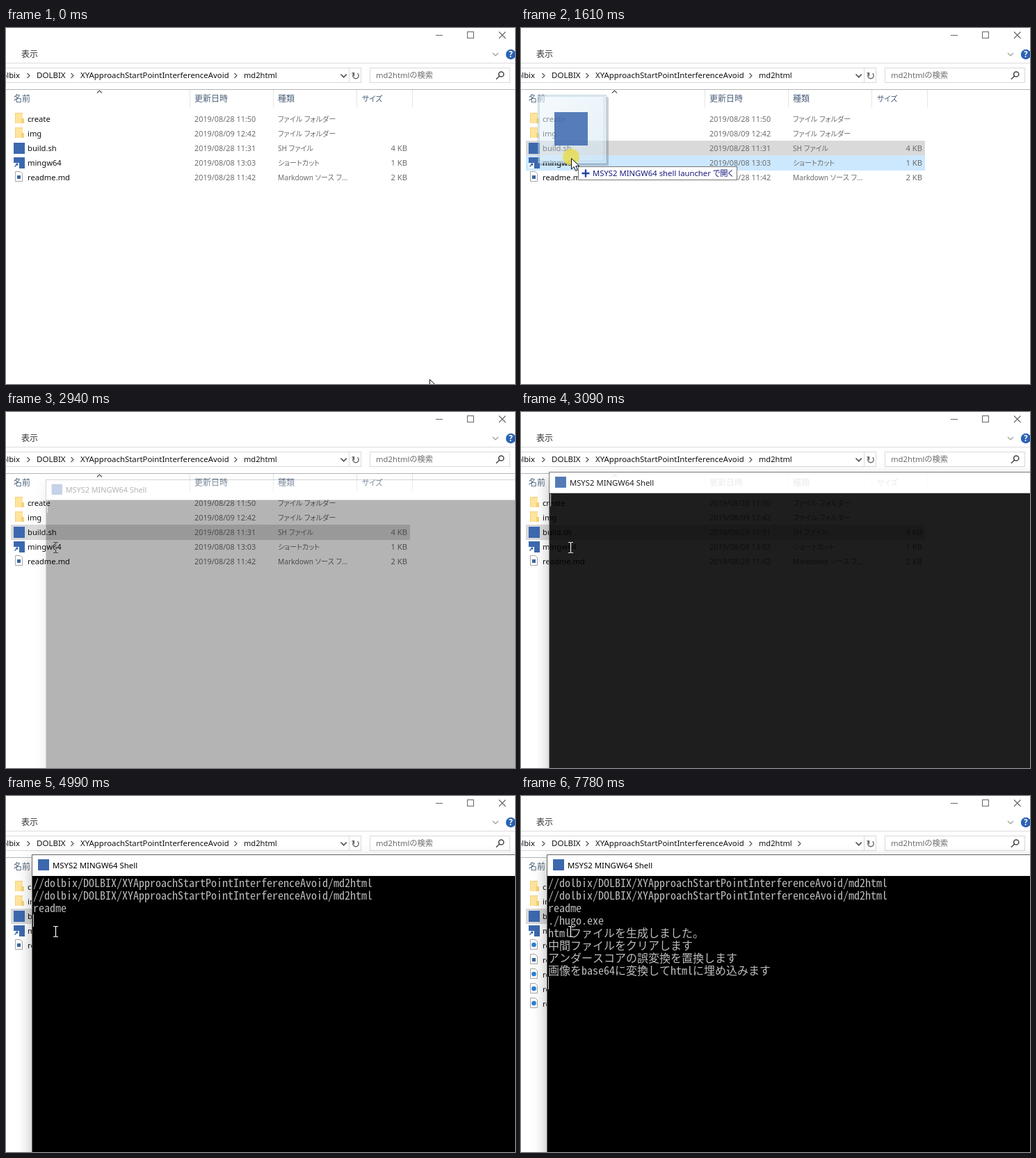
Write an HTML page that moves like this. It is 732 px wide and 512 px high and loops after 8000 ms.

```html
<!DOCTYPE html>
<html lang="ja">
<head>
<meta charset="utf-8">
<title>Build by drag and drop</title>
<style>
  html, body { margin: 0; width: 100%; height: 100%; overflow: hidden; background: #fff; }
  svg { display: block; width: 732px; height: 512px; }
  text { font-family: "Noto Sans", "Noto Sans CJK JP", "Noto Sans CJK", sans-serif; font-feature-settings: "palt"; white-space: pre; }
  .console text { font: 16px "Noto Sans Mono CJK JP", "Noto Sans CJK JP", monospace; font-weight: 300; font-feature-settings: normal; }
  .line { fill: none; stroke-width: 1.2; }
  #beam { mix-blend-mode: difference; }
  #shell { filter: drop-shadow(0 8px 10px rgba(0, 0, 0, .3)); }
</style>
</head>
<body>
<svg id="stage" viewBox="0 0 732 512"></svg>
<script>
const LOOP = 8000;
const BLUE = '#3c68ae', GREY = '#6d6d6d', HEAD = '#4c607a', INK = '#111';
const ROW_TOP = 162, ROW_H = 21;

const text = (x, y, str, size = 11.2, fill = INK, extra = '') =>
  `<text x="${x}" y="${y}" font-size="${size}" fill="${fill}" ${extra}>${str}</text>`;
const rect = (x, y, w, h, fill, extra = '') =>
  `<rect x="${x}" y="${y}" width="${w}" height="${h}" fill="${fill}" ${extra}/>`;
const frame = (x, y, w, h, stroke, fill = '#fff') =>
  rect(x + .5, y + .5, w - 1, h - 1, fill, `stroke="${stroke}"`);
const path = (d, stroke, extra = '') => `<path class="line" d="${d}" stroke="${stroke}" ${extra}/>`;
const group = (id, body, extra = '') => `<g id="${id}" ${extra}>${body}</g>`;
const chevron = x => path(`M${x} 65l3.5 3.5l-3.5 3.5`, '#555');
const END = 'text-anchor="end"';

// File icons, drawn around the row's text baseline
const page = (y, mark) =>
  `<path d="M13.5 ${y - 12.5}h7l3 3v11h-10z" fill="#fff" stroke="#a5a5a5"/>` + mark;
const icons = {
  folder: y => rect(13, y - 13, 11, 15, '#f3d27a') + rect(14, y - 12, 10, 14, '#ffe49c') +
    rect(22, y - 5, 4, 7, '#f5d376'),
  shell: y => rect(11, y - 12, 16, 16, BLUE),
  link: y => rect(11, y - 12, 16, 16, BLUE) + rect(11, y - 4, 8, 8, '#fff') +
    path(`M13 ${y + 2}q0-4 4-4m-2-1.5l2 1.5l-2 2`, '#2b5fae'),
  markdown: y => page(y, rect(16, y - 7, 5, 5, '#3a679f')),
  html: y => page(y, `<circle cx="18.5" cy="${y - 5}" r="3.3" fill="#2a80d2"/>`)
};
const fileRow = (y, icon, name, date, kind, size = '') =>
  icons[icon](y) + text(31, y, name, 11.2) +
  (date ? text(271, y, date, 10.85, GREY) + text(391, y, kind, 10.2, GREY) : '') +
  text(577, y, size, 11.2, GREY, END);

const explorer = () => [
  rect(618, 10, 10, 1, '#666'), frame(663, 5, 10, 10, '#666'),
  path('M709 5.5l9.5 9.5m0-9.5l-9.5 9.5', '#666'),
  text(22, 42, '表示', 12, '#333'), path('M700 36l4 4l4-4', '#999'),
  '<circle cx="726" cy="38" r="7.2" fill="#2a62b5"/>',
  text(726, 42.3, '?', 11.5, '#fff', 'text-anchor="middle" font-weight="700"'),
  rect(0, 50, 732, 1, '#dcdcdc'),
  frame(-5, 57, 516, 22, '#d9d9d9'), rect(493, 58, 1, 20, '#d9d9d9'),
  text(20, 72, 'dolbix', 11.3, INK, END), chevron(30.5),
  text(44, 72, 'DOLBIX', 11.5), chevron(93.5),
  text(107, 72, 'XYApproachStartPointInterferenceAvoid', 11.4), chevron(328.5),
  text(342, 72, 'md2html', 11.1), group('crumb', chevron(398.5)),
  path('M481.5 66.5l4.2 4.2l4.2-4.2', '#555', 'style="stroke-width:1.7"'),
  path('M505.5 65.2a4.2 4.2 0 1 1-5 0m0 4v-4.4h-3', '#666', 'style="stroke-width:1.4"'),
  frame(523, 57, 202, 22, '#d9d9d9'), text(532, 72, 'md2htmlの検索', 11.3, GREY),
  path('M709.5 69.3l-4.5 4.5M708.6 66.5a3.6 3.6 0 1 1 7.2 0a3.6 3.6 0 1 1-7.2 0', '#444', 'style="stroke-width:1.5"'),
  rect(0, 88, 732, 1, '#b4b4b4'),
  ...[264, 384, 504, 584].map(x => rect(x, 89, 1, 25, '#e5e5e5')),
  path('M131 93.5l3.5-3.5l3.5 3.5', '#555'),
  text(11, 105.5, '名前', 12, HEAD), text(271, 105.5, '更新日時', 12, HEAD),
  text(391, 105.5, '種類', 12, HEAD), text(512, 105.5, 'サイズ', 10.8, HEAD),
  rect(7, ROW_TOP, 574, ROW_H + 1, 'none', 'id="buildRow"'),
  rect(7, ROW_TOP + ROW_H, 574, ROW_H + 1, 'none', 'id="linkRow"'),
  rect(7, ROW_TOP + 2 * ROW_H, 574, ROW_H + 1, 'none', 'id="readmeRow"'),
  fileRow(135, 'folder', 'create', '2019/08/28 11:50', 'ファイル フォルダー'),
  fileRow(156, 'folder', 'img', '2019/08/09 12:42', 'ファイル フォルダー'),
  fileRow(177, 'shell', 'build.sh', '2019/08/28 11:31', 'SH ファイル', '4 KB'),
  fileRow(198, 'link', 'mingw64', '2019/08/08 13:03', 'ショートカット', '1 KB'),
  group('readme', fileRow(219, 'markdown', 'readme.md', '2019/08/28 11:42', 'Markdown ソース フ...', '2 KB')),
  ...[219, 261, 282, 303].map(y => group('', fileRow(y, 'html', 'readme.html'), 'class="output"'))
].join('');

const LOG = [
  '//dolbix/DOLBIX/XYApproachStartPointInterferenceAvoid/md2html',
  '//dolbix/DOLBIX/XYApproachStartPointInterferenceAvoid/md2html',
  'readme', './hugo.exe', 'htmlファイルを生成しました。', '中間ファイルをクリアします',
  'アンダースコアの誤変換を置換します', '画像をbase64に変換してhtmlに埋め込みます'
];
const shell = () =>
  rect(37, 84, 890, 581, '#666') + rect(38, 85, 888, 30, '#fff') + rect(38, 115, 888, 549, '#000') +
  rect(46, 91, 16, 16, BLUE) + text(67, 104, 'MSYS2 MINGW64 Shell', 11.4, '#000') +
  group('', LOG.map((s, i) => text(39, 131 + 18 * i, s, 16, '#bcbcbc', 'data-log')).join(''), 'class="console"') +
  rect(39, 116, 1, 18, '#ddd', 'id="caret"');

// Pointer parts are drawn relative to the pointer's tip
const ghost = () =>
  group('', rect(-45, -88, 99, 99, '#000', 'opacity=".35" rx="2"') +
    frame(-48, -91, 99, 99, '#8fb0c4', '#dcebf4') +
    rect(-45.5, -88.5, 93, 93, 'url(#glass)', 'stroke="#9fc4d8"'), 'opacity=".55"') +
  rect(-24, -66, 48, 48, BLUE, 'opacity=".85"');
const tip = () =>
  frame(10, 12, 229, 20, '#767676') +
  path('M15.5 22h11m-5.5-5.5v11', '#2040a8', 'style="stroke-width:2.4"') +
  text(31, 26, 'MSYS2 MINGW64 shell launcher で開く', 11.3, '#1a1a7c');
const arrow = '<path d="M.5.5v15.5l3.7-3.4l2.5 5.8l2.6-1.1l-2.5-5.7h5z" fill="#fff" stroke="#111"/>';

document.getElementById('stage').innerHTML =
  `<defs><linearGradient id="glass" x2="1" y2="1"><stop stop-color="#eef7fc"/><stop offset="1" stop-color="#cfe5f2"/></linearGradient></defs>` +
  explorer() + group('shell', shell()) +
  group('pointer', group('ghost', ghost()) +
    '<circle id="press" cx="0" cy="-1.5" r="12" fill="#e8dc48" opacity=".8"/>' +
    group('tip', tip()) + arrow) +
  group('beam', path('M68 187.5h2.5l1 1l1-1h2.5M71.5 188v14M68 202.5h2.5l1-1l1 1h2.5', '#fff'));

const $ = id => document.getElementById(id);
const show = (el, on) => el.setAttribute('visibility', on ? 'visible' : 'hidden');
// Value of the last step that has begun, for rows of [time, ...values]
const at = (steps, t) => steps.reduce((now, s) => s[0] <= t ? s : now).slice(1);

const ease = p => p * p * (3 - 2 * p);
const approach = Array.from({ length: 9 }, (_, k) => {
  const p = ease(k / 8);
  return [k ? 70 + (k - 1) * 520 / 7 : 0, 609 - 537 * p, 505 - 331 * p];
});
const POINTER = [...approach,
  [1060, 54, 180], [1137, 60, 183], [1213, 72, 188], [1290, 82, 191],
  [1470, 80, 190], [1540, 76, 188], [1610, 72, 187],
  [1780, 70, 190], [1855, 69, 193], [1930, 71, 195]];
const OPENING = [[0, 1, 0], [2940, .955, .29], [3015, .982, .62], [3090, .993, .88], [3170, 1, 1]];
const CARET = [[0, 0], [3400, -1], [3950, 0], [4460, -1], [4840, 2], [4990, 3], [5470, 4], [6000, -1],
  [6550, 6], [6780, 7], [7260, -1], [7550, 8]];
const LOGGED = [[0, 0], [4840, 2], [4990, 3], [5470, 4], [6550, 6], [6780, 7], [7550, 8]];
const OUTPUTS = [[0, 0], [6550, 1], [7010, 2], [7090, 3], [7550, 4]];
const CRUMB = [[0, 0], [6000, 1], [6550, 0], [6860, 1], [7010, 0], [7320, 1], [7550, 0], [7780, 1]];

function render(t) {
  const [x, y] = at(POINTER, t);
  const pressed = t >= 910 && t < 2160, dragging = t >= 1060 && t < 2160;
  const onLink = dragging && y > 183;
  const hover = t < 910 && x < 581 ? Math.floor((y - ROW_TOP) / ROW_H) : -1;
  const tint = i => hover === i ? '#e5f3ff' : 'none';

  $('pointer').setAttribute('transform', `translate(${Math.round(x)} ${Math.round(y)})`);
  show($('pointer'), t < 2940);
  for (const [id, on] of [['ghost', dragging], ['press', pressed], ['tip', onLink]])
    $(id).style.display = on ? '' : 'none';
  $('buildRow').setAttribute('fill', t >= 2160 || onLink ? '#d9d9d9' : pressed ? '#cce8ff' : tint(0));
  $('linkRow').setAttribute('fill', onLink ? '#cce8ff' : tint(1));
  $('readmeRow').setAttribute('fill', tint(2));

  const [scale, alpha] = at(OPENING, t);
  $('shell').setAttribute('transform', `translate(482 374) scale(${scale}) translate(-482 -374)`);
  $('shell').setAttribute('opacity', alpha);
  show($('beam'), alpha);

  const [row] = at(CARET, t), [lines] = at(LOGGED, t), [files] = at(OUTPUTS, t);
  show($('caret'), row >= 0);
  $('caret').setAttribute('y', 116 + 18 * row);
  document.querySelectorAll('[data-log]').forEach((el, i) => show(el, i < lines));
  document.querySelectorAll('.output').forEach((el, i) => show(el, i < files));
  $('readme').setAttribute('transform', `translate(0 ${files ? ROW_H : 0})`);
  show($('crumb'), at(CRUMB, t)[0]);
}

const start = performance.now();
function tick() {
  render((performance.now() - start) % LOOP);
  requestAnimationFrame(tick);
}
tick();
</script>
</body>
</html>
```
